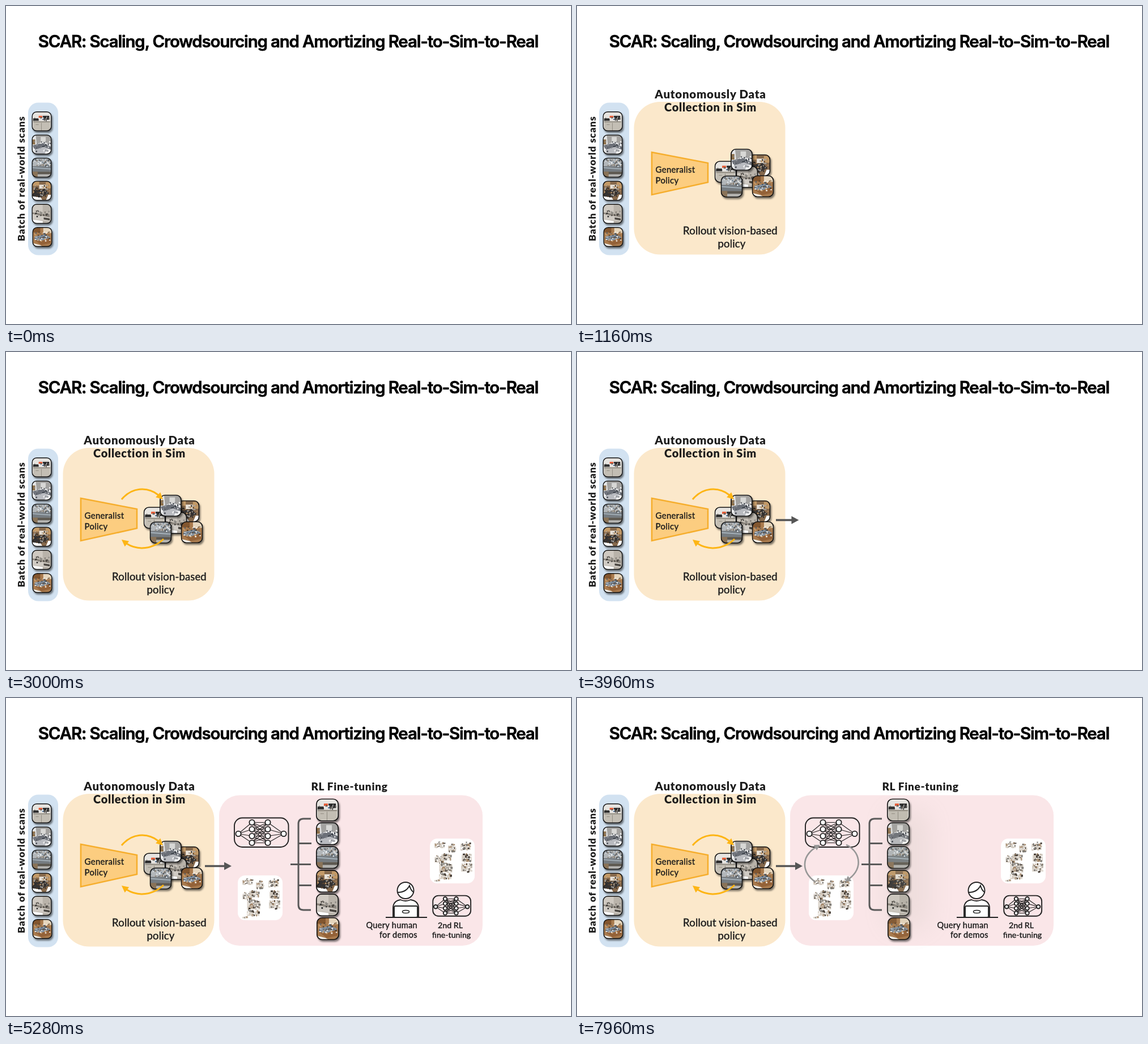
An HTML page for the animation above (8000 ms loop, 997x561 px).

```html
<!DOCTYPE html>
<html lang="en">
<head>
<meta charset="utf-8">
<title>Real-to-Sim-to-Real</title>
<style>
html, body { margin: 0; width: 100%; height: 100%; overflow: hidden; background: #fff; }
svg { display: block; width: 997px; height: 561px; }
text { font-family: Lato, "Open Sans", sans-serif; fill: #1c1c1c; }
.title { font: 600 29.5px Inter, sans-serif; letter-spacing: -1.19px; fill: #000; stroke: #000; stroke-width: .6; }
.head { font-weight: 900; font-size: 20.5px; letter-spacing: .7px; }
.note { stroke: #1c1c1c; stroke-width: .4; }
.mid { text-anchor: middle; }
.end { text-anchor: end; }
.line { fill: none; stroke: #222; stroke-width: 1.9; }
.line * { vector-effect: non-scaling-stroke; }
.thumb { filter: drop-shadow(2px 3px 1.5px rgba(0, 0, 0, .5)); }
</style>
</head>
<body>
<svg viewBox="0 0 997 561">
  <defs>
    <clipPath id="round"><rect x="1" y="1" width="38" height="38" rx="9"/></clipPath>
    <g id="scenes"></g>
    <g id="net"></g>
    <g id="cutouts"></g>
  </defs>

  <text class="title mid" x="498" y="73">SCAR: Scaling, Crowdsourcing and Amortizing Real-to-Sim-to-Real</text>

  <rect x="39" y="170.500" width="53" height="269" rx="18" fill="#d2e2f1"/>
  <text class="mid" transform="translate(33 304.500) rotate(-90)" font-size="17.500" font-weight="900" letter-spacing=".9">Batch of real-world scans</text>
  <g id="scans"></g>

  <g id="collect">
    <rect x="100.500" y="169" width="267" height="269.500" rx="46" fill="#fbe8cb"/>
    <text class="head mid" x="235.500" y="163">Autonomously Data</text>
    <text class="head mid" x="235.500" y="185.500" style="font-size:20px">Collection in Sim</text>
    <path d="M132 258L231 277V311L132 333Z" fill="#fccd80" stroke="#f6ae2d" stroke-width="2.600"/>
    <g class="note" font-size="15" letter-spacing=".3">
      <text x="138.500" y="294">Generalist</text>
      <text x="138.500" y="312.500">Policy</text>
    </g>
    <g class="note mid" font-size="18.500" letter-spacing=".15">
      <text x="270.500" y="403">Rollout vision-based</text>
      <text x="273" y="425.500">policy</text>
    </g>
    <g id="pile"></g>
  </g>

  <g id="tune">
    <rect x="376" y="171.500" width="465" height="265.500" rx="36" fill="#fae6e8"/>
    <text class="head mid" x="606" y="163" style="font-size:19px">RL Fine-tuning</text>
    <use href="#net" x="450.500" y="237"/>
    <use href="#net" transform="translate(786.500 366.500) scale(.7)"/>
    <use href="#cutouts" x="409" y="313"/>
    <use href="#cutouts" x="748" y="248"/>
    <path d="M538 213H525Q516 213 516 222V365Q516 374 525 374H538M516 256.500H539M502 293.500H538M516 330.500H539" fill="none" stroke="#595959" stroke-width="3"/>
    <g id="column"></g>
    <g class="line">
      <path d="M683 386V371Q683 358 696 356Q705 360 714 356Q728 358 728 371V386" fill="#fff"/>
      <circle cx="705" cy="339.500" r="14.500" fill="#fff"/>
      <path d="M691 343Q706 343 712 331Q714 339 719.500 343"/>
      <rect x="685" y="367" width="41" height="20" rx="2" fill="#fff"/>
      <ellipse cx="705.500" cy="377" rx="6" ry="2.500" stroke-width="1.500"/>
      <path d="M670 387H743"/>
    </g>
    <g class="note" font-size="14.500" letter-spacing=".35">
      <text class="end" x="726" y="405.500">Query human</text>
      <text class="end" x="726" y="423">for demos</text>
    </g>
    <g class="note mid" font-size="14.200">
      <text x="784" y="405.500">2nd RL</text>
      <text x="786" y="423">fine-tuning</text>
    </g>
  </g>

  <g id="arrows"></g>
  <rect id="haze" x="545" y="198" width="78" height="210" rx="20" fill="#a5a796"/>
</svg>
<script>
const $ = id => document.getElementById(id);
const LOOP = 8000, STEP = 40;

let seed = 7;
const rnd = (a, b) => {
  seed = (seed * 16807) % 2147483647;
  return a + (b - a) * seed / 2147483647;
};
const box = (x, y, w, h, c) =>
  `<rect x="${x.toFixed(1)}" y="${y.toFixed(1)}" width="${w.toFixed(1)}" height="${h.toFixed(1)}" fill="${c}"/>`;
const specks = (n, colors, x, y, w, h, size) =>
  Array.from({ length: n }, (_, i) =>
    box(rnd(x, x + w), rnd(y, y + h), rnd(1, size), rnd(1, size), colors[i % colors.length])).join('');

// Kitchen scans: background, flat shapes, then small clutter
const dark = ['#222', '#55504a', '#8a8782'];
const scenes = [
  ['#e6e4e0', [['#c3beb4', 'M3 20H37V38H3Z'], ['#2b2b2b', 'M3 14H14V19H3ZM22 9H35V17H22Z'], ['#e8562f', 'M14 9H21V13H14Z'],
    ['#456f9c', 'M21 13H25V17H21Z'], ['#8f8a80', 'M3 20H37V22H3ZM19 23H20V38H19ZM8 26H14V27H8Z']], [22, [...dark, '#fff'], 3, 9, 32, 9, 3.5]],
  ['#e4e5e6', [['#a3a2a0', 'M8 0H40V19L22 15L10 19Z'], ['#d8d8d6', 'M18 5H28V15H18Z'], ['#8d6f48', 'M0 10H7V20H0Z'],
    ['#6b6f77', 'M2 22L21 17L40 25V31L24 25L6 31Z'], ['#b9bbc0', 'M6 31L24 25L34 30L24 40H8Z'], ['#fff', 'M31 30L40 32V40H25Z']],
    [34, ['#333840', '#8a8d93', '#f4f4f4'], 2, 13, 34, 20, 3.5]],
  ['#b3b7ba', [['#767c81', 'M0 17H40V28H0Z'], ['#a6b2bb', 'M0 19L40 22V24L0 21Z'], ['#5d5850', 'M0 28H40V34H0Z'],
    ['#8a7358', 'M0 28H12V40H0Z'], ['#b3b2af', 'M12 33H40V40H12Z']], [70, ['#4b535a', '#e9edf0', '#7e8c98', '#86796a'], 0, 2, 38, 15, 3]],
  ['#86694c', [['#c39a68', 'M0 0H15V10H0ZM28 3H40V15H28Z'], ['#e9e2d8', 'M15 8H28V16H15Z'], ['#343232', 'M4 19L26 16L34 25L18 34H2Z'],
    ['#fff', 'M0 31L18 33L22 40H0ZM33 28H40V40H28Z']], [65, ['#222', '#5c4530', '#b99368', '#a5a5a3'], 1, 8, 34, 23, 3]],
  ['#b9b3aa', [['#cfc9c1', 'M0 0H22V17H0Z'], ['#8d867d', 'M0 17L36 23V27L0 20Z'], ['#d0cbc4', 'M0 20L36 27V35L0 30Z'],
    ['#fff', 'M0 31L22 34V40H0Z'], ['#4a4641', 'M24 27L36 29V33L24 31Z']], [26, dark, 6, 12, 28, 13, 3.5]],
  ['#a97b4e', [['#e6d6bd', 'M22 0H40V12H22Z'], ['#82562f', 'M0 0H16V11H0Z'], ['#8592a0', 'M5 19L26 15L37 21L18 28L5 26Z'],
    ['#946238', 'M5 26L18 28L37 21V32L18 36Z'], ['#f2eee8', 'M0 32L16 36L22 40H0Z']], [50, ['#f4efe8', '#4a5866', '#c79f70', '#57412c'], 4, 9, 31, 18, 3]],
];
$('scenes').innerHTML = scenes.map(([bg, shapes, clutter], i) =>
  `<symbol id="scan${i}" viewBox="0 0 40 40"><g clip-path="url(#round)">${box(0, 0, 40, 40, bg)}` +
  shapes.map(([c, d]) => `<path fill="${c}" d="${d}"/>`).join('') + specks(...clutter) +
  `</g><rect x="1" y="1" width="38" height="38" rx="9" fill="none" stroke="#111" stroke-width="1.700"/></symbol>`).join('');

const thumb = (i, cx, cy, s) =>
  `<use class="thumb" href="#scan${i}" x="${cx - s / 2}" y="${cy - s / 2}" width="${s}" height="${s}"/>`;
const stack = (cx, cy, gap, s) =>
  scenes.map((_, i) => thumb(i, cx + (i === 5 ? 1 : 0), cy + gap * i, s)).join('');
$('scans').innerHTML = stack(63, 203.5, 40.8, 35.5);
$('column').innerHTML = stack(567, 197.5, 41.9, 40.5);
$('pile').innerHTML = [[0, 262, 292.5], [3, 322, 281], [4, 300, 301.5], [2, 273, 318.5], [1, 290.500, 271], [5, 328, 318]]
  .map(([i, x, y]) => thumb(i, x, y, 39)).join('');

// Neural network around (0, 0)
const rows = [-17.5, -5.5, 6.5, 18.5], cols = [-16.5, 11.5], ends = [-40.5, 39.5];
const link = (x1, y1, x2, y2) => `M${x1} ${y1}L${x2} ${y2}`;
const node = (x, y) => `<circle cx="${x}" cy="${y}" r="4.600" fill="#fff"/>`;
$('net').innerHTML =
  `<g class="line"><rect x="-47.500" y="-25.500" width="95.500" height="51.500" rx="14"/><path stroke-width="1.100" d="` +
  rows.map(y => link(ends[0], 2.5, cols[0], y) + link(cols[1], y, ends[1], 2.5) +
    rows.map(z => link(cols[0], y, cols[1], z)).join('')).join('') + '"/>' +
  ends.map(x => node(x, 2.5)).join('') + cols.map(x => rows.map(y => node(x, y)).join('')).join('') + '</g>';

// White tile of small furniture cut-outs: centre and size of each
const spots = [[17, 11, 18, 12], [39, 16, 14, 15], [63, 13, 18, 15], [16, 36, 15, 14], [29, 32, 18, 14],
  [65, 33, 18, 16], [28, 50, 23, 22], [65, 51, 20, 16], [27, 66, 22, 12], [13, 74, 10, 4]];
$('cutouts').innerHTML = '<rect width="79" height="79" rx="13" fill="#fff"/>' + spots.map(([x, y, w, h]) =>
  box(x - w / 2, y - h / 4, w, h * .7, '#ddd6cd') +
  specks(w * h / 9, ['#40372f', '#cfc8be', '#a58a6e', '#fff', '#7d7a75'], x - w / 2, y - h / 2, w - 2, h - 2, 4)).join('');

const clamp = v => Math.min(1, Math.max(0, v));
const ease = p => p * p * (3 - 2 * p);

// Arrows that grow along their path, head first
const arrows = [
  ['M204 260C224 236 256 236 277 260', '#fdb515', 3, 12, 6, 1600, 720],
  ['M278 330C256 351 224 351 204 331', '#fdb515', 3, 12, 6, 2320, 680],
  ['M351 296.500H398', '#555', 3.6, 13, 7, 3440, 680],
  ['M475 259C500 270 508 303 473 324', '#979797', 2.6, 10, 5.5, 5760, 640],
  ['M421 325C393 305 396 275 429 259', '#979797', 2.6, 10, 5.5, 6400, 720],
].map(([d, color, width, head, half, start, span]) => {
  const g = document.createElementNS('http://www.w3.org/2000/svg', 'g');
  g.innerHTML = `<path d="${d}" fill="none" stroke="${color}" stroke-width="${width}"/>` +
    `<path d="M0 0L${-head} ${-half}V${half}Z" fill="${color}"/>`;
  $('arrows').append(g);
  const [shaft, tip] = g.children, len = shaft.getTotalLength();
  return t => {
    const p = clamp((t - start) / span), at = len * ease(p);
    g.style.display = p > 0 ? '' : 'none';
    const end = shaft.getPointAtLength(at);
    const back = shaft.getPointAtLength(Math.max(0, at - head));
    const angle = Math.atan2(end.y - back.y, end.x - back.x) * 180 / Math.PI;
    shaft.setAttribute('stroke-dasharray', `${Math.max(0, at - head + 1)} ${len * 2}`);
    tip.setAttribute('transform', `translate(${end.x} ${end.y}) rotate(${angle})`);
  };
});

function focus(id, t, start, span, strength = 1) {
  const p = clamp((t - start) / span), style = $(id).style;
  style.display = p > 0 ? '' : 'none';
  style.opacity = ease(p) * strength;
  style.filter = p < 1 ? `blur(${31 * Math.sqrt(1 - p)}px)` : 'none';
}

function draw(now) {
  const t = Math.floor(now % LOOP / STEP) * STEP;
  focus('collect', t, 480, 680);
  focus('tune', t, 4640, 640);
  focus('haze', t, 7600, 680, .25);
  arrows.forEach(grow => grow(t));
  requestAnimationFrame(draw);
}
draw(performance.now());
</script>
</body>
</html>
```
